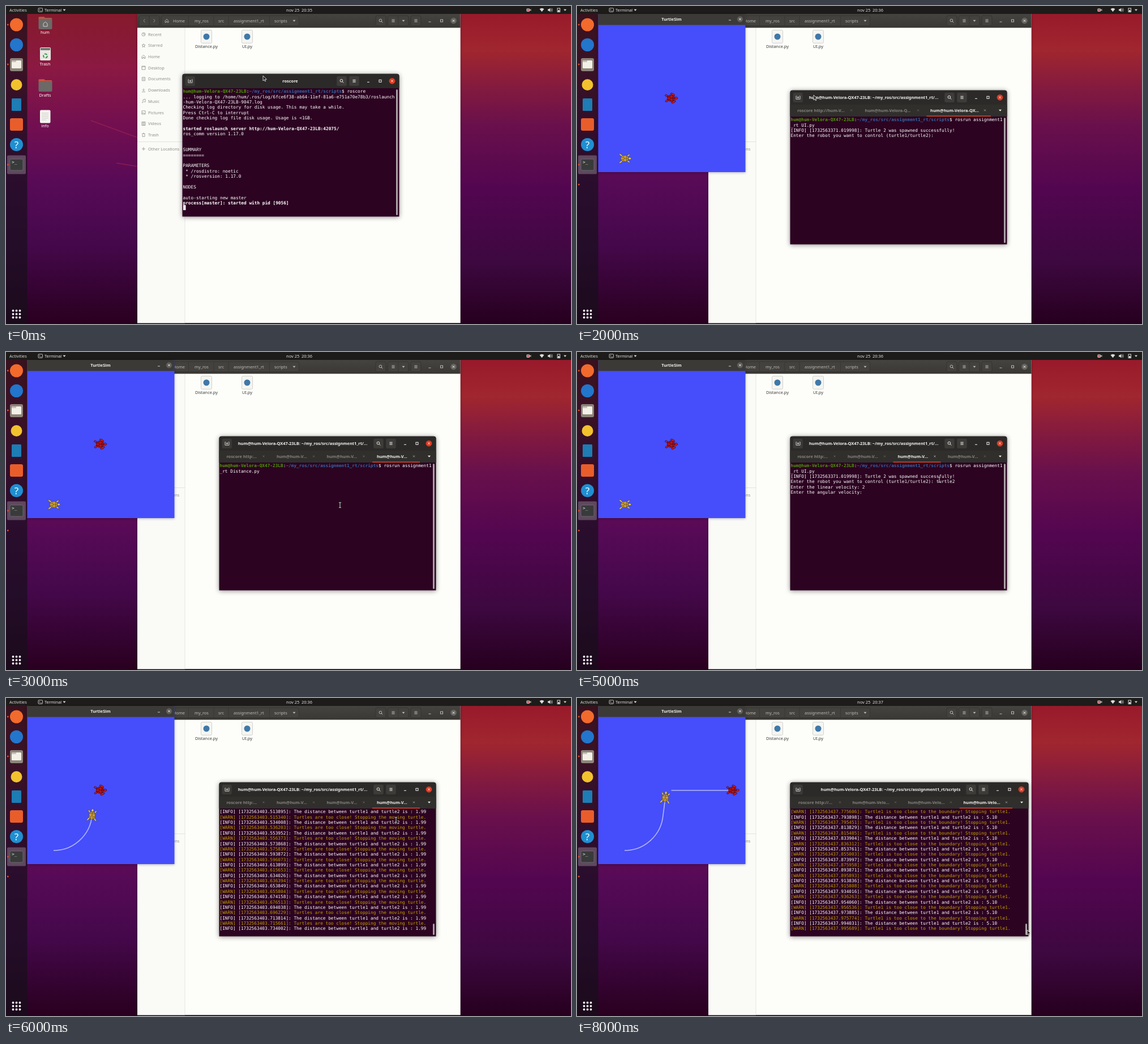
Recreate the animation shown at these times as an HTML page. Size 998 px wide and 561 px high, loop 9000 ms.

```html
<!DOCTYPE html>
<html lang="en">
<head>
<meta charset="utf-8">
<title>Turtle demo desktop</title>
<style>
html, body { margin: 0; width: 100%; height: 100%; overflow: hidden; background: #2a0022 }
svg { display: block; width: 998px; height: 561px }
text { font: 7.4px "Noto Sans", "Open Sans", sans-serif; white-space: pre }
.bold { font-weight: 700 }
.mid { text-anchor: middle }
.mono { font: 7.775px "DejaVu Sans Mono", monospace }
.shadow { filter: drop-shadow(0 1px 4px rgba(0, 0, 0, .45)) }
.soft { filter: drop-shadow(0 1px 2px rgba(0, 0, 0, .3)) }
</style>
</head>
<body>
<svg viewBox="0 0 998 561">
  <defs>
    <linearGradient id="left" x2="0" y2="1">
      <stop stop-color="#861a2c"/><stop offset=".17" stop-color="#8b1942"/>
      <stop offset=".36" stop-color="#720f50"/><stop offset=".55" stop-color="#570a57"/>
      <stop offset=".75" stop-color="#44084a"/><stop offset="1" stop-color="#29001f"/>
    </linearGradient>
    <linearGradient id="right" x2="0" y2="1">
      <stop stop-color="#981a2b"/><stop offset=".12" stop-color="#a0262f"/>
      <stop offset=".23" stop-color="#851b3e"/><stop offset=".36" stop-color="#69104c"/>
      <stop offset=".56" stop-color="#530650"/><stop offset=".8" stop-color="#3d0840"/>
      <stop offset="1" stop-color="#26001e"/>
    </linearGradient>
    <linearGradient id="bar" x2="0" y2="1">
      <stop stop-color="#454440"/><stop offset="1" stop-color="#393835"/>
    </linearGradient>
  </defs>
  <g id="desk"></g>
  <g id="live"></g>
</svg>
<script>
const rect = (x, y, w, h, fill, more = '') =>
  `<rect x="${x}" y="${y}" width="${w}" height="${h}" fill="${fill}" ${more}/>`;
const disc = (x, y, r, fill, more = '') => `<circle cx="${x}" cy="${y}" r="${r}" fill="${fill}" ${more}/>`;
const line = (d, stroke, width = 1, more = '') =>
  `<path d="${d}" stroke="${stroke}" stroke-width="${width}" fill="none" ${more}/>`;
const fillPath = (d, fill, more = '') => `<path d="${d}" fill="${fill}" ${more}/>`;
const panel = (x, y, w, h, fill, more = '') =>
  fillPath(`M${x} ${y + h}V${y + 4}q0-4 4-4H${x + w - 4}q4 0 4 4V${y + h}z`, fill, more);
const text = (x, y, s, fill, cls = '') => `<text x="${x}" y="${y}" fill="${fill}" class="${cls}">${s}</text>`;
const at = (x, y, body, angle = 0) => `<g transform="translate(${x} ${y}) rotate(${angle})">${body}</g>`;
const span = (s, fill, weight = 700) => `<tspan fill="${fill}" font-weight="${weight}">${s}</tspan>`;
const caret = (x, y, fill) => fillPath(`M${x - 2.5} ${y - 1.2}h5l-2.5 3z`, fill);

const user = 'hum', host = 'hum-Velora-QX47-23LB', who = user + '@' + host;
const cwd = '~/my_ros/src/assignment1_rt/scripts';

// Window controls, measured from the right edge
const controls = (right, y, color, closeFill) =>
  line(`M${right - 56} ${y + 2}h4`, color) +
  rect(right - 35, y - 2, 4, 4, 'none', `stroke="${color}"`) +
  disc(right - 12, y, 5.4, closeFill) +
  line(`M${right - 13.8} ${y - 1.8}l3.6 3.6m0-3.6l-3.6 3.6`, '#fff', .9);
const lens = (x, y, c) => disc(x - .6, y - .6, 2.3, 'none', `stroke="${c}"`) + line(`M${x + 1} ${y + 1}l2.3 2.3`, c);
const burger = (x, y, c) => line(`M${x - 2.6} ${y - 2}h5.2m-5.2 2h5.2m-5.2 2h5.2`, c, .9);
const button = (x, y, w, fill) => rect(x, y, w, 17.5, fill, 'rx="2.5" stroke="#2f2e2c" stroke-width=".6"');

function folder(x, y) {
  return rect(x - 12, y - 11, 11, 5, '#d8452b', 'rx="1.5"') +
    rect(x - 12, y - 9, 24, 20, '#6c6967', 'rx="2"') + line(`M${x - 11} ${y - 8.5}h22`, '#e0563a');
}

function dock() {
  return rect(0, 14, 37.5, 547, '#15101a', 'opacity=".68"') +
    disc(18.5, 33, 11.5, '#f26a2c') + disc(18.5, 68.5, 11.5, '#2276cc') +
    rect(7, 92, 23, 23, '#8d857b', 'rx="3"') + rect(10, 96, 17, 14, '#f3f0e8', 'rx="1.5"') + rect(10, 96, 8, 3, '#c9c2b7') +
    disc(18.5, 139, 10, '#f2c22e') + rect(10, 163, 17, 22, '#1d7db4', 'rx="1.5"') +
    rect(7, 198, 23, 22, '#e95d2b', 'rx="3"') + disc(18.5, 244.5, 11.5, '#1f8fd1') +
    `<text x="18.5" y="250.5" fill="#fff" class="mid" style="font-size:17px">?</text>` +
    [0, 1, 2].flatMap(i => [0, 1, 2].map(j => disc(12.5 + 6 * i, 537.5 + 6 * j, 1.9, '#f2f0f2'))).join('');
}

function desktopIcons() {
  const label = (y, s) => text(69, y, s, '#fff', 'mid');
  return folder(69.5, 30) + line('M66 33v-2l3.5-3 3.5 3v5h-7z', '#ddd', .9) + label(49, user) +
    rect(60, 73, 19, 23, '#e9e8e4', 'rx="2"') + rect(61, 74, 17, 4, '#777470') +
    disc(69.5, 88, 3.4, 'none', 'stroke="#3d9a50" stroke-width="2" stroke-dasharray="5 2"') + label(104.5, 'Trash') +
    folder(69.5, 140) + label(159.5, 'Drafts') +
    rect(60, 183.5, 18.5, 23, '#f4f3ef', 'rx="2"') + line('M63 189h12m-12 3h12m-12 3h12m-12 3h12m-12 3h8', '#c4c2bf', .8) +
    label(214, 'info');
}

function fileWindow() {
  const ink = '#bdbbb7', grey = '#8e8e8a', field = '#43423e';
  const crumbs = [[295, 'Home'], [333, 'my_ros'], [375, 'src'], [402, 'assignment1_rt'], [474, 'scripts']];
  const places = ['Recent', 'Starred', 'Home', 'Desktop', 'Documents', 'Downloads', 'Music', 'Pictures', 'Videos', 'Trash'];
  const shapes = [
    'M3 0a3 3 0 1 1-6 0a3 3 0 1 1 6 0M0-2v2h2', 'M0-3l1 2h2l-1.6 1.5.6 2.4-2-1.3-2 1.3.6-2.4L-3-1h2z',
    'M-3 0l3-3 3 3v3h-2v-2h-2v2h-2z', 'M-3-3h6v6h-6zM-3-2h6', 'M-2.5-3h5v6h-5zM-1-1h2M-1 1h2',
    'M0-3v4m-2-2l2 2 2-2M-3 3h6', 'M-1 2v-5l4-1v5M-3 2h2M1 1h2', 'M-3-3h6v6h-6zM-3 2l2-2 2 2 1-1',
    'M-3-3h6v6h-6zM-1-3v6M1-3v6', 'M-2-1v4h4v-4M-3-2h6M-1-3h2'];
  const file = (x, name) => rect(x - 9.5, 42.5, 19, 23, '#f5f5f2', 'rx="2" stroke="#c8c8c4" stroke-width=".8"') +
    disc(x, 54, 5.5, '#3f78a8') + text(x, 74.3, name, '#3a3a38', 'mid');
  return rect(232, 14, 570.7, 545.3, '#fdfdf9', 'class="soft"') + rect(232, 38, 84, 521.3, '#fafaf7') +
    line('M316 38v521', '#e0e0dc', .8) + line('M232 239.5h84', '#dededa', .8) +
    rect(232, 14, 570.7, 24.4, 'url(#bar)') +
    button(235, 17, 36, field) + line('M253 17v18', '#2e2d2a', .7) +
    line('M245.5 23l-2.5 3 2.5 3m15-6l2.5 3-2.5 3', '#96948f', .9) +
    button(274.5, 17, 243, field) + line('M322.5 17v18M367 17v18M393 17v18M465.5 17v18', '#353430', .7) +
    line('M281 26l3-3 3 3v3h-2v-2h-2v2h-2z', ink, .8) +
    crumbs.map(([x, s]) => text(x, 28.6, s, ink)).join('') + caret(509, 26, ink) +
    button(653, 17, 18, field) + lens(662, 26, ink) + button(674.5, 17, 36.5, field) + line('M693 17v18', '#353430', .7) +
    burger(684, 26, ink) + caret(702, 26, ink) + button(715, 17, 18, field) + burger(724, 26, ink) +
    controls(802.5, 26, ink, '#66645f') +
    places.map((s, i) => at(243, 50 + i * 19.7, line(shapes[i], grey, .8)) + text(251, 52.6 + i * 19.7, s, grey)).join('') +
    line('M240 252h6m-3-3v6', grey, .8) + text(251, 254.6, 'Other Locations', grey) +
    file(354, 'Distance.py') + file(426, 'UI.py');
}

function tray() {
  const c = '#dddcda';
  return rect(0, 0, 998, 14, '#1d1c1a') + text(6, 9.7, 'Activities', c) +
    rect(919.5, 4.5, 5.5, 5.2, '#d5d0ce', 'rx="1"') + fillPath('M925 7l2.3-2v4z', '#d5d0ce') + disc(922.2, 7, 1.7, '#d0353a') +
    fillPath('M942.5 5.2q4-3 8 0l-4 5z', c) + fillPath('M957 5.5h2l2.5-2v7l-2.5-2h-2z', c) +
    line('M962.8 5q1.5 2 0 4M964 3.6q2.5 3.4 0 6.8', c, .7) +
    rect(974, 4, 4.5, 6.5, 'none', `stroke="${c}"`) + rect(975, 7, 2.5, 3, c) + caret(987.5, 7, c);
}

document.getElementById('desk').innerHTML =
  rect(0, 14, 400, 547, 'url(#left)') + rect(400, 14, 598, 547, 'url(#right)') +
  line('M150 202L232 232M195 277L232 283', '#a0264f', 1.6, 'opacity=".65"') +
  desktopIcons() + dock() + fileWindow() + tray();

function turtle(x, y, angle, red) {
  const [skin, shell, edge] = red ? ['#d01a22', '#b5121b', '#3a0710'] : ['#d6c498', '#c99d3b', '#5a4722'];
  const leg = (lx, ly, rx, ry, turn) =>
    `<ellipse rx="${rx}" ry="${ry}" transform="translate(${lx} ${ly}) rotate(${turn})"/>`;
  const legs = red
    ? leg(2.5, -6.5, 4, 1.7, 30) + leg(4, 6.5, 4, 1.7, -25) + leg(-8.5, -4.5, 2.6, 1.5, 20) + leg(-8, 5, 2.6, 1.5, -25)
    : leg(6.5, -5.5, 2.8, 1.3, -35) + leg(6.5, 5.5, 2.8, 1.3, 35) + leg(-7, -6, 3.6, 1.3, 38) + leg(-7, 6, 3.6, 1.3, -38);
  const shape = `<g fill="${skin}" stroke="${edge}" stroke-width=".7">${legs}
    <ellipse cx="8.6" rx="2.7" ry="2"/><ellipse cx="-.5" rx="6.8" ry="5.6" fill="${shell}"/>
    <path d="M-7-2L-3-2L-1-5M-7 2L-3 2L-1 5M-3-2L0 0L-3 2M0 0H3M3-4L3 4M3 0H6" fill="none"/></g>`;
  return at(x, y, shape, angle);
}

function turtleWindow({ turtleFocus, trail, red = 166.5 }) {
  const arc = 'M84 269A68.3 68.3 0 0 0 152 207';
  const pose = [[84.5, 269, 0], [152, 207, -84], [156, 176, -83]][trail];
  const pen = d => line(d, '#b5b7ff', 1.6);
  return rect(37.5, 14, 260, 279, '#454efa', `class="${turtleFocus ? 'shadow' : 'soft'}"`) +
    rect(37.5, 14, 260, 19.5, turtleFocus ? '#2c2b29' : '#3b3a37') +
    text(167, 26, 'TurtleSim', '#f0efed', 'bold mid') + line('M268 25h4', '#ccc') +
    disc(288, 23.3, 5.2, turtleFocus ? '#e6451f' : '#5e5c58') + line('M286.3 21.6l3.4 3.4m0-3.4l-3.4 3.4', '#fff', .9) +
    (trail ? pen(arc + (trail > 1 ? 'L156 176' : '')) : '') + (red > 167 ? pen(`M166.5 163H${red}`) : '') +
    turtle(red, 162.5, 0, true) + turtle(...pose);
}

function terminal({ x = 377, y = 149, w = 382, h = 271, title = (who + ': ' + cwd).slice(0, 54) + '...', titleX = 147,
  tabs = [], active = tabs.length - 1, lines, thumb, cursor, turtleFocus }) {
  const dim = turtleFocus, right = x + w, mid = y + 12.3;
  const ink = dim ? '#aaa8a4' : '#f4f3f1', header = dim ? '#3b3a37' : '#2b2a28';
  const top = y + (tabs.length ? 46 : 25), tabW = (w - 28) / tabs.length, pitch = 9.36;
  const name = (n, i) => (i ? who + ': ' + cwd : 'roscore http://' + host).slice(0, n) + '...';
  const tabRow = tabs.map((n, i) => {
    const left = x + i * tabW, on = i === active, c = on ? ink : '#85837f', end = left + tabW - 10.5;
    return (on ? line(`M${left + 4.5} ${top - .8}H${left + tabW}`, '#d9472b', 1.6) : '') +
      text(left + tabW / 2 - 5, y + 37.6, name(n, i), c, 'bold mid') +
      line(`M${end - 1.5} ${y + 33.5}l3 3m0-3l-3 3`, on ? '#aaa' : '#696763', .8);
  }).join('');
  const rows = lines.map((s, i) => text(x + .5, top + 8.4 + i * pitch, s, '#fff', 'mono')).join('');
  const box = cursor === undefined ? '' : rect(x + 1, top + .2 + cursor * pitch, 4.5, 9, dim ? 'none' : '#fff',
    dim ? 'stroke="#ccc" stroke-width=".7"' : '');
  const from = thumb || top + 2;
  return panel(x - .5, y - .3, w + 1, h + .8, dim ? '#32072a' : '#2c0421', 'class="shadow"') +
    panel(x - .5, y - .3, w + 1, top - y + .3, header) +
    (tabs.length ? rect(x - .5, y + 25, w + 1, 21, dim ? '#383733' : '#302f2c') + tabRow + caret(right - 11.5, y + 35, ink) : '') +
    button(x + 4.5, y + 3.7, 17.5, '#3b3a37') +
    line(`M${x + 11} ${mid - 2.5}h-1v5.5h7v-5.5h-1M${x + 13.5} ${mid - 2}v4m-2-2h4`, ink, .8) +
    text(x + titleX, y + 14.8, title, ink, 'bold mid') +
    button(right - 110, y + 3.7, 18, '#3d3c39') + lens(right - 101, mid, ink) +
    button(right - 88, y + 3.7, 18, '#3d3c39') + burger(right - 79, mid, ink) +
    controls(right, mid, ink, dim ? '#5e5c58' : '#e0391f') +
    rows + box + rect(right - 5, from, 3, y + h - 2 - from, dim ? '#43253d' : '#aaa0a6', 'rx="1.5"');
}

function pointer(kind, x, y) {
  if (kind === 'arrow')
    return at(x, y, fillPath('M0 0v9l2-2 1.5 3 1.3-.6-1.4-3h2.9z', '#222', 'stroke="#eee" stroke-width=".8"'));
  const d = 'M-2-4.5h1.5l.5.7.5-.7h1.5M0-4v8m-2 .5h1.5l.5-.7.5.7h1.5';
  return at(x, y, line(d, '#222', 2) + line(d, '#ddd', .9));
}

const prompt = cmd => span(who, '#4e9a06') + ':' + span(cwd, '#3465a4') + '$ ' + cmd;
const log = (sec, stamps, dist, warning, odd = 1) => stamps.split(' ').map((us, i) => {
  const stamp = ` [${1732563000 + sec}.${us}]: `;
  return warning && i % 2 === odd
    ? span('[WARN]' + stamp + warning, '#c4a000', 400)
    : `[INFO]${stamp}The distance between turtle1 and turtle2 is : ${dist}`;
});
const bold = s => span(s, '#fff');

const boot = [prompt('roscore'),
  `... logging to /home/${user}/.ros/log/6fce6f38-ab64-11ef-81a6-e751a70e78b3/roslaunch`, `-${host}-9047.log`,
  'Checking log directory for disk usage. This may take a while.', 'Press Ctrl-C to interrupt',
  'Done checking log file disk usage. Usage is &lt;1GB.', '', bold(`started roslaunch server http://${host}:42075/`),
  'ros_comm version 1.17.0', '', '', 'SUMMARY', '========', '', 'PARAMETERS', ' * /rosdistro: noetic',
  ' * /rosversion: 1.17.0', '', 'NODES', '', 'auto-starting new master', bold('process[master]: started with pid [9056]')];
const node = [prompt('rosrun turtlesim t'), 'urtlesim_node',
  '[ INFO] [1732563347.716831519]: Starting turtlesim with node name /turtlesim',
  '[ INFO] [1732563347.718456705]: Spawning turtle [turtle1] at x=[5,544445], y=[5,', '544445], theta=[0,000000]'];
const ask = 'Enter the robot you want to control (turtle1/turtle2): ';
const ui = [prompt('rosrun assignment1'), '_rt UI.py', '[INFO] [1732563371.019998]: Turtle 2 was spawned successfully!', ask];
const moves = [...ui.slice(0, 3), ask + 'turtle2', 'Enter the linear velocity: 2', 'Enter the angular velocity: '];
const four = [13, 9, 9, 9];

const states = [
  { time: '20:35', bare: true, x: 312, y: 120, h: 251, title: 'roscore', titleX: 190, lines: boot, cursor: 22, mouse: ['arrow', 454, 123] },
  { time: '20:35', turtleFocus: true, x: 312, y: 120, tabs: [34, 32], lines: node, cursor: 5, mouse: ['beam', 513.5, 253] },
  { tabs: [20, 16, 17], lines: ui, mouse: ['arrow', 418, 157] },
  { tabs: four, lines: [prompt('rosrun assignment1'), '_rt Distance.py'], mouse: ['beam', 590, 270] },
  { tabs: four, thumb: 336, cursor: 23, mouse: ['beam', 590, 231], lines: log(383, '093913 113805 133920 153953 173890 193933 213959 233971 254068 273955 294185 313924 334001 353951 373857 393843 413960 433889 453941 474040 494026 513941 534052', '5.76') },
  { tabs: four, active: 2, lines: moves, mouse: ['beam', 640, 225] },
  { tabs: four, trail: 1, thumb: 398, mouse: ['beam', 689, 215], lines: log(403, '513895 515340 534008 536203 553952 556373 573868 575839 593872 596073 613899 615653 634026 636394 653849 655804 674158 676513 694038 696229 713814 715661 734002', '1.99', 'Turtles are too close! Stopping the moving turtle.') },
  { time: '20:37', tabs: four, active: 2, trail: 2, mouse: ['beam', 640, 225], lines: [...moves.slice(0, 5), moves[5] + '1', ask + 'turtle2', 'Enter the linear velocity: 1', moves[5] + '0', ask] },
  { time: '20:37', w: 420, title: who + ': ' + cwd, titleX: 177, tabs: [15, 12, 12, 12], trail: 2, red: 275, thumb: 398, mouse: ['arrow', 795, 409], lines: log(437, '775606 793898 795451 813829 815485 833904 836312 853761 855003 873997 875958 893871 895893 913836 915808 934016 936263 954060 956536 973885 975774 994031 995689', '5.10', 'Turtle1 is too close to the boundary! Stopping turtle1.', 0) }
];

function dockState({ bare, turtleFocus }) {
  const dots = [33, 103, 280, ...(bare ? [] : [315])];
  return rect(2, turtleFocus ? 299 : 263.5, 33, 33, '#fff', 'rx="2" opacity=".24"') +
    rect(7, 270, 23, 20, '#393b3b', 'rx="2" stroke="#777" stroke-width=".7"') +
    text(10, 278, '&gt;_', '#eee', 'mono') + dots.map(y => disc(3.3, y, 1.4, '#e5512a')).join('');
}

function topState({ time = '20:36', turtleFocus }) {
  const c = '#e4e3e1';
  return text(518, 9.7, 'nov 25  ' + time, c, 'mid') + (turtleFocus
    ? text(68, 9.7, 'turtlesim_node', c) + caret(126.5, 7, c)
    : rect(57, 3.8, 7.5, 6.5, 'none', `stroke="${c}" stroke-width=".8" rx="1"`) + line('M58.5 5.5l1.5 1.5-1.5 1.5M61 8.7h2', c, .7) +
      text(68, 9.7, 'Terminal', c) + caret(103, 7, c));
}

const live = document.getElementById('live');
let shown = -1;
function draw() {
  const step = Math.floor(performance.now() / 1000) % states.length;
  if (step !== shown) {
    const s = { trail: 0, ...states[shown = step] };
    live.innerHTML = topState(s) + dockState(s) + (s.bare ? '' : turtleWindow(s)) + terminal(s) + pointer(...s.mouse);
  }
  requestAnimationFrame(draw);
}
draw();
</script>
</body>
</html>
```
